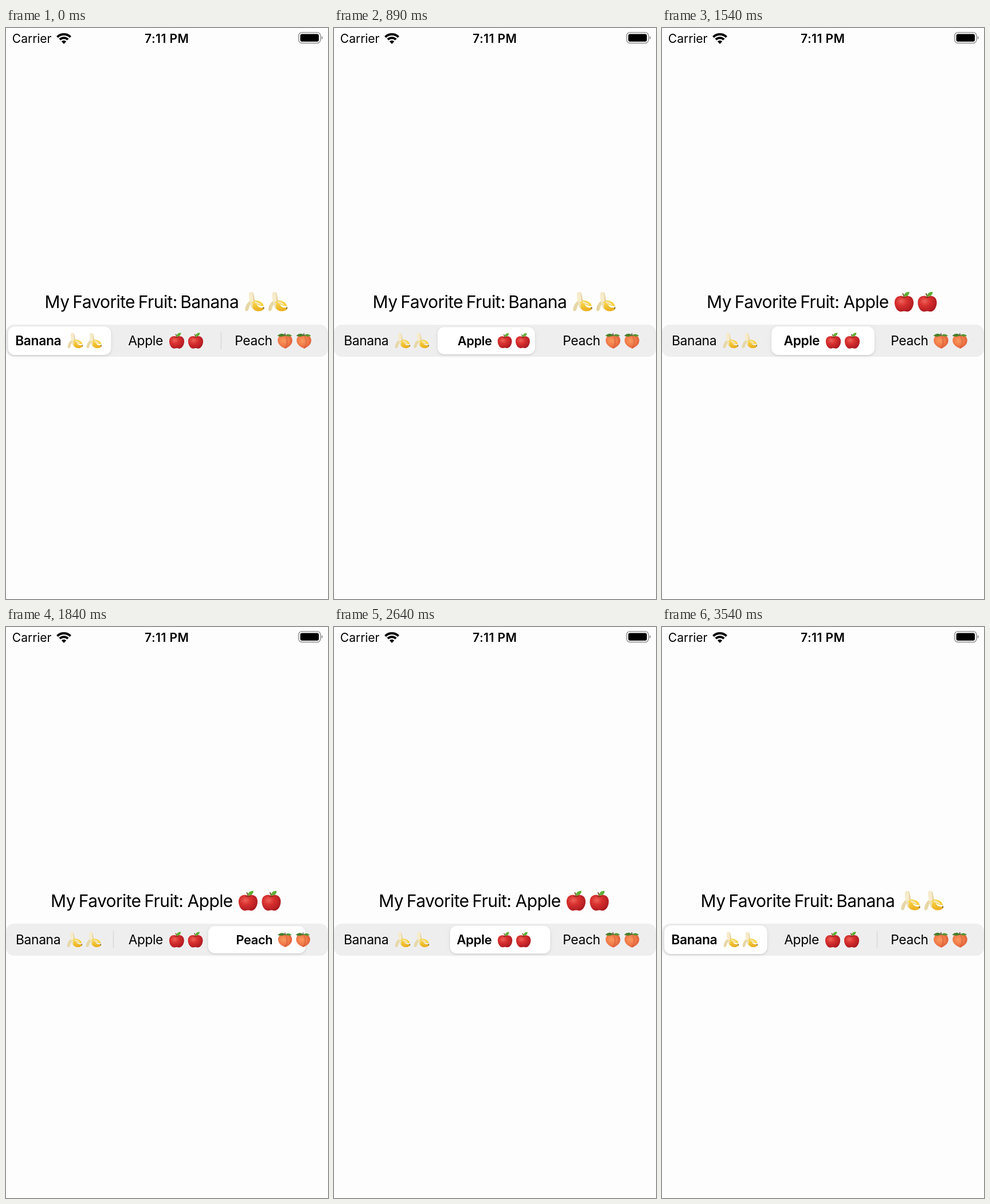
Write an HTML page that moves like this. It is 562x997 px and loops after 3590 ms.

```html
<!DOCTYPE html>
<html lang="en">
<head>
<meta charset="utf-8">
<title>Favorite fruit</title>
<style>
  html, body { margin: 0; width: 100%; height: 100%; overflow: hidden; background: #fdfdfd; }
  svg { display: block; width: 562px; height: 997px; font-family: Inter, sans-serif; }
  #pill rect { fill: #fff; filter: drop-shadow(0 1.5px 1.5px #0002) drop-shadow(0 2px 4px #0000000c); }
  .label { font-size: 22.8px; letter-spacing: -.35px; }
  .title { font-size: 29.9px; letter-spacing: -.55px; word-spacing: -2px; }
  .status { font-size: 21px; }
</style>
</head>
<body>
<svg viewBox="0 0 562 997">
  <defs>
    <radialGradient id="red" cx=".36" cy=".34" r=".72">
      <stop offset="0" stop-color="#ee6259"/>
      <stop offset=".4" stop-color="#d8312f"/>
      <stop offset="1" stop-color="#ab1820"/>
    </radialGradient>
    <radialGradient id="orange" cx=".4" cy=".42" r=".7">
      <stop offset="0" stop-color="#fa9a5f"/>
      <stop offset=".55" stop-color="#ef7847"/>
      <stop offset="1" stop-color="#d65535"/>
    </radialGradient>
    <linearGradient id="yellow" x2=".3" y2="1">
      <stop offset="0" stop-color="#fbdc4e"/>
      <stop offset="1" stop-color="#ebb020"/>
    </linearGradient>

    <symbol id="Banana" viewBox="0 0 100 100">
      <path fill="#e6d7a6" d="M30 44C17 53 4 72 5 92C10 99 20 95 22 87C25 73 30 62 39 55Z"/>
      <path fill="#f6ebca" d="M24 8C25 1 42 0 45 8C50 22 50 36 53 52L32 60C25 44 22 24 24 8Z"/>
      <path fill="#e0cd98" d="M40 4C47 8 49 30 53 52L45 55C45 36 45 18 40 4Z"/>
      <path fill="url(#yellow)" d="M36 52C32 76 46 95 70 96C82 96 92 92 96 85L92 77C75 83 61 72 54 46Z"/>
      <path fill="#f7d036" d="M50 44C66 44 90 48 96 72C80 70 62 68 52 55Z"/>
      <path fill="#f3e5b0" d="M51 47C66 49 78 55 84 66C72 65 58 62 51 54Z"/>
      <path fill="#eee0b4" d="M33 55C30 67 34 79 43 86C40 74 42 65 46 55Z"/>
      <path fill="#7c6228" d="M91 78L96 75L98 82L94 87Z"/>
    </symbol>
    <symbol id="Apple" viewBox="0 0 100 100">
      <path fill="url(#red)" d="M50 26C66 16 96 22 96 54C96 76 82 98 65 98C58 98 56 96 50 96C44 96 42 98 35 98C18 98 4 76 4 54C4 22 34 16 50 26Z"/>
      <path fill="#8d1518" d="M33 26Q50 38 67 26Q50 31 33 26Z"/>
      <path fill="none" stroke="#7a4a22" stroke-width="5" stroke-linecap="round" d="M50 31Q50 18 44 11"/>
      <path fill="#5fae35" d="M49 24C50 8 60 2 76 2C76 16 66 26 49 24Z"/>
    </symbol>
    <symbol id="Peach" viewBox="0 0 100 100">
      <path fill="url(#orange)" d="M50 17C70 9 96 22 95 50C94 76 70 90 53 98C36 93 6 77 5 50C4 22 30 9 50 17Z"/>
      <path fill="none" stroke="#c85234" stroke-width="3" d="M50 19C68 38 66 72 53 96"/>
      <path fill="#487f2b" d="M52 17C40 3 18 2 3 20C18 27 38 26 52 17Z"/>
      <path fill="#5c9436" d="M51 17C64 5 82 8 93 20C80 26 63 25 51 17Z"/>
      <path fill="none" stroke="#4b4a45" stroke-width="5" d="M51 19L49 4"/>
    </symbol>
  </defs>

  <g class="status">
    <text x="10.8" y="25.8">Carrier</text>
    <text x="280.7" y="25.8" text-anchor="middle" font-weight="600" letter-spacing=".45">7:11 PM</text>
  </g>
  <g fill="none" stroke="#000" stroke-width="4">
    <path d="M89.5 15.8A16.3 16.3 0 0 1 112.5 15.8M93.9 20.2A10 10 0 0 1 108.1 20.2"/>
    <path fill="#000" stroke="none" d="M101 27.8L96.8 23.5A5.9 5.9 0 0 1 105.2 23.5Z"/>
  </g>
  <rect x="510.8" y="7.8" width="38" height="18.6" rx="5.5" fill="none" stroke="#999" stroke-width="1.6"/>
  <rect x="513.6" y="10.4" width="32.4" height="13.4" rx="3"/>
  <path fill="#999" d="M550.6 14Q553 15 553 17T550.6 20.2Z"/>

  <text class="title" y="488.8"><tspan id="prefix">My Favorite Fruit:</tspan><tspan id="choice"></tspan></text>
  <use id="title0" y="460" width="36" height="36"/>
  <use id="title1" y="460" width="36" height="36"/>

  <rect y="518" width="562" height="56" rx="14" fill="#eeeeef"/>
  <rect class="divider" x="186.7" y="531" width="1.6" height="30" fill="#d9dadb"/>
  <rect class="divider" x="374.7" y="531" width="1.6" height="30" fill="#d9dadb"/>
  <g id="pill"><rect x="-90" y="-25" width="180" height="50" rx="12"/></g>
  <g id="labels"></g>
</svg>

<script>
const LOOP = 3590, SPRING = 0.0215, SHRINK = 0.055, MIDDLE = 546;

// textX / iconX: label parts; prefixX / wordX / titleIconX: heading parts
const fruits = [
  { name: 'Banana', x: 93.5, textX: 17, iconX: 119.5, prefixX: 67.6, wordX: 304.2, titleIconX: 433.5 },
  { name: 'Apple', x: 281, textX: 213.2, iconX: 298, prefixX: 78.1, wordX: 316.6, titleIconX: 422.5 },
  { name: 'Peach', x: 469, textX: 399.2, iconX: 487, prefixX: 75.6, wordX: 312.2, titleIconX: 424.5 },
];

const drags = [
  { press: 530, move: 698, release: 1050, to: 1 },
  { press: 1535, move: 1690, release: 1960, to: 2 },
  { press: 2235, move: 2418, release: 2562, to: 1 },
  { press: 2972, move: 3130, release: 3270, to: 0 },
];

const byId = id => document.getElementById(id);
const clamp = v => Math.max(0, Math.min(1, v));
const set = (el, attrs) => { for (const k in attrs) el.setAttribute(k, attrs[k]); };
const add = (parent, tag, attrs) => {
  const el = document.createElementNS('http://www.w3.org/2000/svg', tag);
  set(el, attrs);
  return parent.appendChild(el);
};

// Critically damped spring from 0 to 1
const spring = ms => {
  const k = SPRING * Math.max(0, ms);
  return 1 - (1 + k) * Math.exp(-k);
};

for (const f of fruits) {
  f.group = add(byId('labels'), 'g', { class: 'label' });
  f.text = add(f.group, 'text', { y: 554.2 });
  f.text.textContent = f.name;
  f.icons = [0, 1].map(() =>
    add(f.group, 'use', { href: '#' + f.name, y: MIDDLE - 14.2, width: 28.4, height: 28.4 }));
}
const dividers = [...document.querySelectorAll('.divider')];

function showTitle(f) {
  set(byId('prefix'), { x: f.prefixX });
  set(byId('choice'), { x: f.wordX });
  byId('choice').textContent = f.name;
  [0, 1].forEach(i => set(byId('title' + i), { href: '#' + f.name, x: f.titleIconX - 18 + i * 40.5 }));
}

function showLabel(f, bold, scale) {
  set(f.group, { transform: `translate(${f.x - 1} ${MIDDLE}) scale(${scale}) translate(${1 - f.x} ${-MIDDLE})` });
  set(f.text, { x: f.textX - (bold ? 0.8 : 0), 'font-weight': bold ? 600 : 400 });
  f.icons.forEach((icon, i) => set(icon, { x: f.iconX - 14.2 + i * 33 + (bold ? 1 : 0) }));
}

function draw(t) {
  let x = fruits[0].x, pressed = 0, selected = 0, chosen = 0, from = 0;
  for (const d of drags) {
    x += (fruits[d.to].x - fruits[from].x) * spring(t - d.move);
    pressed += spring(t - d.press) - spring(t - d.release);
    if (t >= d.move) selected = d.to;
    if (t >= d.release) chosen = d.to;
    from = d.to;
  }
  showTitle(fruits[chosen]);
  set(byId('pill'), { transform: `translate(${x} ${MIDDLE}) scale(${1 - SHRINK * pressed})` });
  fruits.forEach((f, i) => {
    const near = clamp(1 - Math.abs(x - f.x) / 187);
    showLabel(f, i === selected, 1 - SHRINK * pressed * near);
  });
  dividers.forEach((el, i) =>
    set(el, { opacity: clamp((Math.abs(x - 187.5 * (i + 1)) - 112) / 70) }));
}

function tick() {
  draw(performance.now() % LOOP);
  requestAnimationFrame(tick);
}
tick();
</script>
</body>
</html>
```
